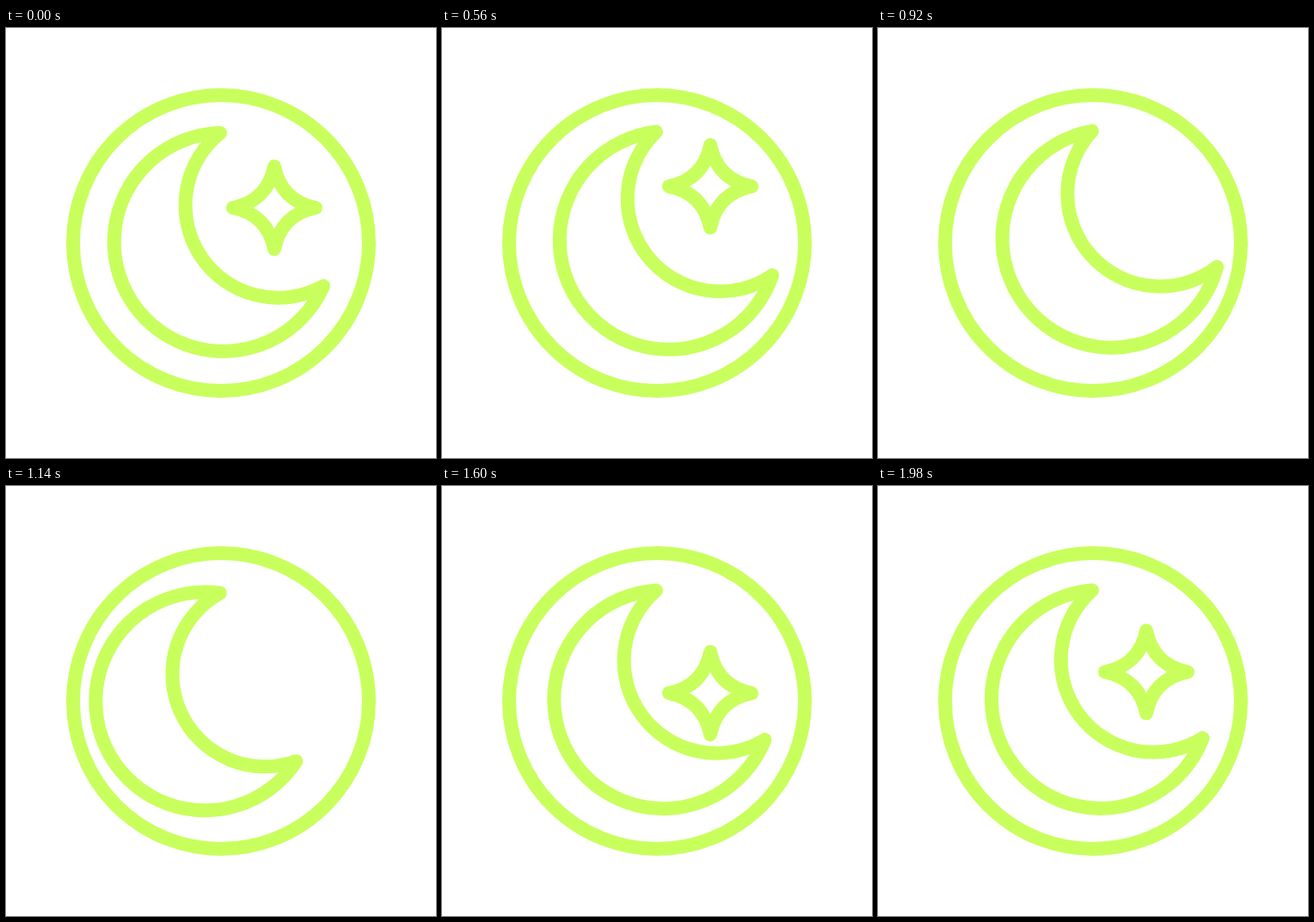
An HTML page for the animation above (2000 ms loop, 500x500 px).

```html
<!DOCTYPE html>
<html lang="en">
<head>
<meta charset="utf-8">
<title>Moon and star</title>
<style>
  html, body { margin: 0; width: 100%; height: 100%; overflow: hidden; background: #fff; }
  svg { display: block; width: 100vw; height: 100vh; }
  .line { fill: none; stroke: #c8ff5d; stroke-width: 16; stroke-linecap: round; stroke-linejoin: round; }
</style>
</head>
<body>
<svg viewBox="0 0 500 500">
  <clipPath id="disc"><circle cx="250" cy="250" r="174"/></clipPath>
  <g class="line">
    <g clip-path="url(#disc)">
      <path id="star" d="M-48 0Q-8 -8 0 -48Q8 -8 48 0Q8 8 0 48Q-8 8 -48 0Z"/>
    </g>
    <path id="moon" d="M249 122A127 127 0 1 0 369 300A107.7 107.7 0 0 1 249 122Z"/>
    <circle cx="250" cy="250" r="172"/>
  </g>
</svg>
<script>
const LOOP = 2000, STEP = 20, START = 240;
const star = document.getElementById('star');
const moon = document.getElementById('moon');

// Moon swing: [time in ms, degrees]
const swing = [
  [START, 0], [400, -2.3], [700, -8.2], [780, -12], [820, -13],
  [1140, 9.6], [1215, 11.7], [1740, -5], [2265, 0]
];

const rate = i => (swing[i + 1][1] - swing[i][1]) / (swing[i + 1][0] - swing[i][0]);

// Slope at a key: flat at the ends and turning points
function slope(i) {
  if (i === 0 || i === swing.length - 1) return 0;
  const a = rate(i - 1), b = rate(i);
  return a * b > 0 ? 2 * a * b / (a + b) : 0;
}

function moonAngle(t) {
  if (t <= START) return 0;
  const i = swing.findIndex((k, n) => t < swing[n + 1][0]);
  const [t0, v0] = swing[i], [t1, v1] = swing[i + 1];
  const d = t1 - t0, u = (t - t0) / d, w = 1 - u;
  return v0 * w * w * (1 + 2 * u) + v1 * u * u * (3 - 2 * u)
    + d * u * w * (slope(i) * w - slope(i + 1) * u);
}

// The star shoots up, drops back in past its place and settles
function starY(t) {
  if (t <= START) return 209;
  if (t < 1000) return 209 - 7.6e-7 * (t - START) ** 3;
  if (t < 1640) return 243 - 102 * ((1640 - t) / 280) ** 2;
  const u = Math.min(1, (t - 1640) / 490);
  return 226 + 17 * Math.cos(Math.PI * u);
}

function draw(now) {
  const t = Math.floor((now % LOOP) / STEP) * STEP;
  moon.setAttribute('transform', `rotate(${moonAngle(t)} 234 122)`);
  star.setAttribute('transform', `translate(312 ${starY(t)})`);
}

const begin = performance.now();
function tick() {
  draw(performance.now() - begin);
  requestAnimationFrame(tick);
}
tick();
</script>
</body>
</html>
```
